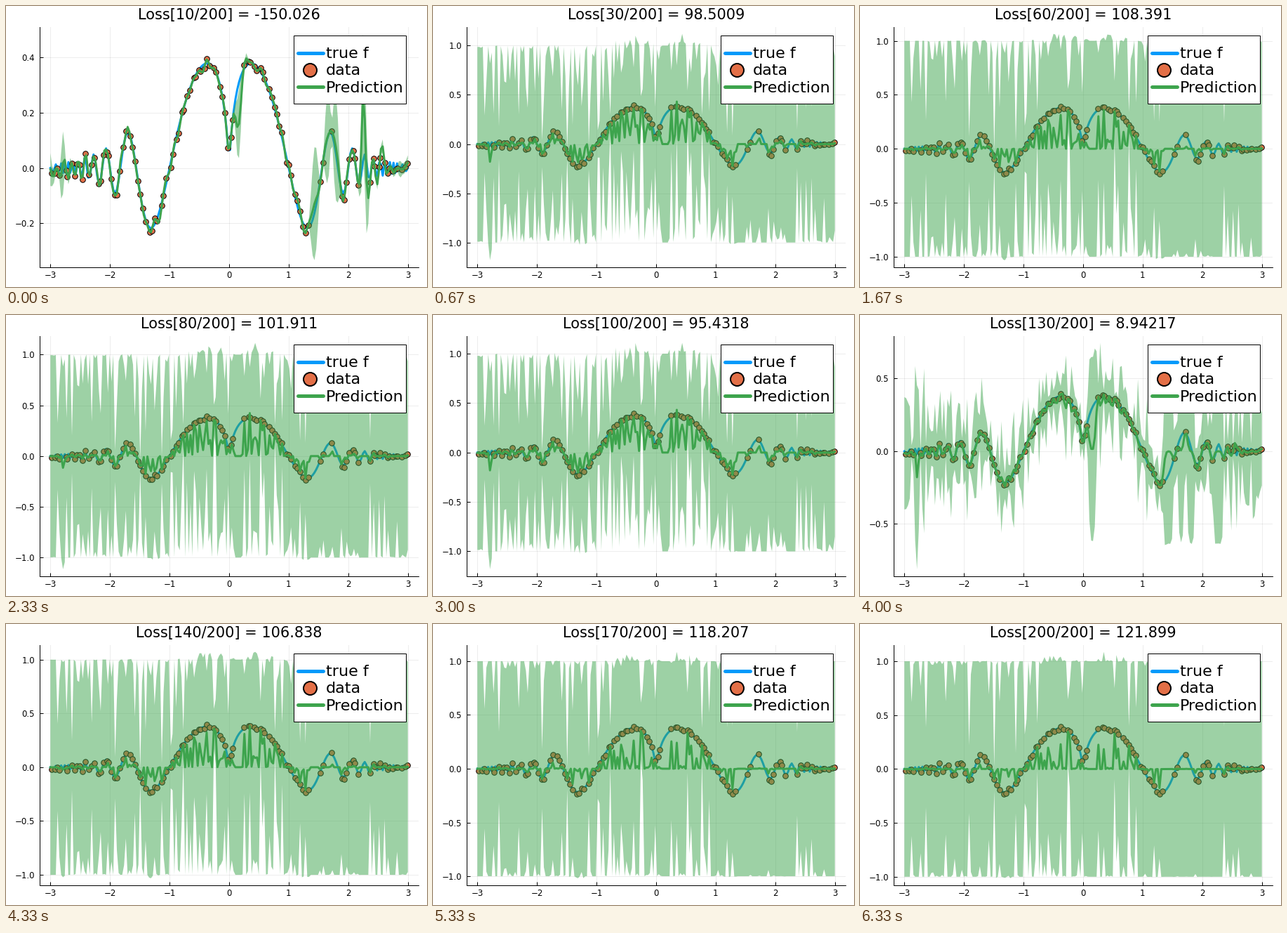
A matplotlib script that plays this animation: 600 by 400 pixels, repeating every 6660 ms.

```python
import numpy as np
import matplotlib.pyplot as plt
from matplotlib.animation import FuncAnimation

W, H, DPI = 600, 400, 100
PX = 72 / DPI                      # points per pixel
BLUE, ORANGE, GREEN = "#009afa", "#e36f47", "#3da44d"
TOP, BOTTOM, RIGHT = 30, 371.5, 588
STEPS = range(10, 201, 10)
plt.rcParams["font.family"] = "DejaVu Sans"


def loss_at(step):
    return np.interp(step, [10, 20, 30, 60, 100, 110, 120, 130, 140, 170, 200],
                     [-150.026, 12.7315, 98.5009, 108.391, 95.4318, 94.1067,
                      63.1648, 8.94217, 106.838, 118.207, 121.899])


def target(x):
    a = np.abs(x)
    return np.sinc(a ** a)


def bump(x, centre, width):
    return np.exp(-((x - centre) / width) ** 2)


def make_samples(count=124):
    rng = np.random.default_rng(7)
    x = np.linspace(-2.99, 2.99, count) + rng.uniform(-.02, .02, count)
    x = np.clip(x, -3, 3)
    x = x[np.abs(x + 2.78) > .03]
    for gap in (.17, 1.43, 1.65, 1.82, 2.25):
        x = x[np.abs(x - gap) > .065]
    return x, target(x) + rng.normal(0, .012, len(x))


grid = np.linspace(-3, 3, 200)
truth = target(grid)
sample_x, sample_y = make_samples()


def warp(x):
    return x * (1 + .02 * x * x)


def kernel(a, b, scale):
    return np.exp(-.5 * ((warp(a)[:, None] - warp(b)[None]) / scale) ** 2)


def fit(loss):
    """Gaussian process whose length scale shrinks as the loss grows."""
    scale = np.interp(loss, [-150, 0, 63, 98, 108, 122],
                      [.075, .036, .021, .012, .0078, .005])
    gram = kernel(sample_x, sample_x, scale) + 2e-4 * np.eye(len(sample_x))
    cross = kernel(grid, sample_x, scale)
    weights = np.linalg.solve(gram, cross.T)
    mean = weights.T @ sample_y
    dev = np.sqrt(np.clip(1 - np.sum(cross.T * weights, axis=0), 1e-4, 1))
    dev *= np.interp(loss, [-150, 0, 60], [.27, .57, 1])

    # Overshoots: a tall spike in the smooth fit, a dip in the medium ones.
    spike = np.clip(-loss / 150, 0, 1) * bump(grid, 2.255, .04)
    depth = .22 * np.clip((scale - .0078) / .004, 0, 1) * (loss > 0)
    mean += .34 * spike - depth * bump(grid, -2.78, .02)
    return mean, dev


def limits(mean, dev):
    lo = min(np.min(mean - dev), sample_y.min())
    hi = max(np.max(mean + dev), sample_y.max())
    margin = .03 * (hi - lo)
    return lo - margin, hi + margin


def tick_values(lo, hi):
    span = hi - lo
    gap, digits = (.2, 1) if span < 1 else (.25, 2) if span < 1.6 else (.5, 1)
    return np.arange(np.ceil(lo / gap), np.floor(hi / gap) + 1) * gap, digits


def labels(values, digits):
    return [f"{v + 0:.{digits}f}".replace("-", "\u2212") for v in values]


fig = plt.figure(figsize=(W / DPI, H / DPI), dpi=DPI, facecolor="white")
ax = fig.add_axes([0, 0, 1, 1])
ax.set_axisbelow(True)
ax.grid(color="black", alpha=.07, lw=PX)
ax.spines[["top", "right"]].set_visible(False)
ax.spines[["left", "bottom"]].set_linewidth(PX)
ax.tick_params(direction="in", length=5 * PX, width=PX, labelsize=8.5)
ax.tick_params(axis="y", pad=5)
ax.tick_params(axis="x", pad=4)
ax.set_xlim(-3.18, 3.18)
ax.set_xticks(range(-3, 4), labels(range(-3, 4), 0))

ax.plot(grid, truth, color=BLUE, lw=3 * PX, zorder=2)
ax.plot(sample_x, sample_y, "o", color=ORANGE, ms=7.6 * PX, mec="black",
        mew=PX, zorder=3)
band, = ax.fill([0, 0, 0], [0, 0, 0], color=GREEN, alpha=.5, lw=0, zorder=4)
line, = ax.plot([], [], color=GREEN, lw=3 * PX, zorder=5)

# Title and legend live on an overlay measured in pixels.
hud = fig.add_axes([0, 0, 1, 1], zorder=5)
hud.set(xlim=(0, W), ylim=(H, 0))
hud.axis("off")
title = hud.text(318, 18.5, "", ha="center", va="baseline", fontsize=15)
hud.add_patch(plt.Rectangle((409.5, 41.5), 160.5, 97.5, fc="white",
                            ec="black", lw=PX))
for y, label, color in ((66.5, "true f", BLUE), (90.5, "data", ORANGE),
                        (115, "Prediction", GREEN)):
    if label == "data":
        hud.plot(433, y, "o", color=color, ms=19 * PX, mec="black", mew=2 * PX)
    else:
        hud.plot([415.5, 452], [y, y], color=color, lw=5 * PX,
                 solid_capstyle="round")
    hud.text(456, y + 8, label, va="baseline", fontsize=16)


def update(step):
    loss = loss_at(step)
    mean, dev = fit(loss)
    lo, hi = limits(mean, dev)
    ticks, digits = tick_values(lo, hi)
    left = 40 + 8 * digits         # wider tick labels push the axis right
    ax.set_position([left / W, 1 - BOTTOM / H, (RIGHT - left) / W,
                     (BOTTOM - TOP) / H])
    ax.set_yticks(ticks, labels(ticks, digits))
    ax.set_ylim(lo, hi)
    line.set_data(grid, mean)
    band.set_xy(np.column_stack([
        np.concatenate([grid, grid[::-1]]),
        np.concatenate([mean + dev, (mean - dev)[::-1]])]))
    title.set_text(f"Loss[{step}/200] = {loss:.6g}")
    title.set_x((left + RIGHT) / 2)
    return line, band, title


anim = FuncAnimation(fig, update, frames=STEPS, interval=333, repeat=True,
                     repeat_delay=0, blit=False)
plt.show()
```
